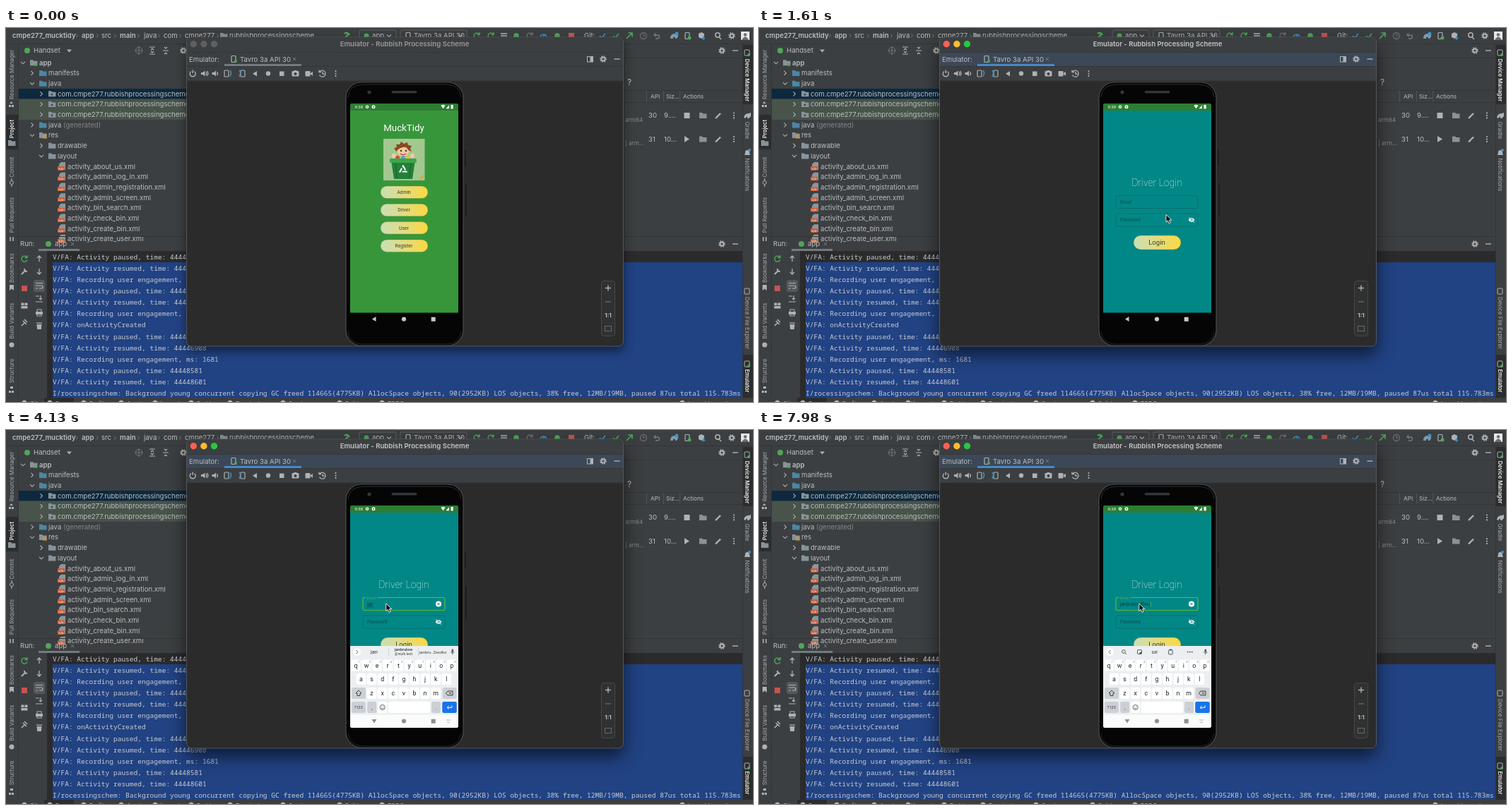
An HTML page that plays this animation: 1057x530 px, repeating every 8000 ms.

```html
<!DOCTYPE html>
<html lang="en">
<head>
<meta charset="utf-8">
<style>
html, body { margin: 0; width: 100%; height: 100%; overflow: hidden; background: #3c3f41; }
svg { display: block; width: 100vw; height: 100vh; font-family: Inter, sans-serif; }
.phone { font-family: Roboto, sans-serif; }
.mono { font-family: "Noto Sans Mono", monospace; }
</style>
</head>
<body>
<svg id="stage" viewBox="0 0 1057 530"></svg>
<script>
const GREY = '#afb1b3', GREEN = '#4fa65a', BLUE = '#3e93c8', TEXT = '#bbbdbf';

const rect = (x, y, w, h, fill, r = 0, more = '') =>
  `<rect x="${x}" y="${y}" width="${w}" height="${h}" rx="${r}" fill="${fill}" ${more}/>`;
const dot = (x, y, r, fill, more = '') => `<circle cx="${x}" cy="${y}" r="${r}" fill="${fill}" ${more}/>`;
const line = (d, color = GREY, w = 1.2, more = '') =>
  `<path d="${d}" fill="none" stroke="${color}" stroke-width="${w}" ${more}/>`;
const shape = (d, fill = GREY) => `<path d="${d}" fill="${fill}"/>`;
const text = (x, y, s, size = 9.6, fill = TEXT, more = '') =>
  `<text x="${x}" y="${y}" font-size="${size}" fill="${fill}" ${more}>${s}</text>`;
const mid = (x, y, s, size, fill, more = '') => text(x, y, s, size, fill, 'text-anchor="middle" ' + more);
const group = (s, more) => `<g ${more}>${s}</g>`;
const list = (items, draw) => items.map(draw).join('');
const BOLD = 'font-weight="600"';

// Small icons, centred on x, y
const gear = (x, y, c = GREY, s = 1) =>
  dot(x, y, 2.6 * s, 'none', `stroke="${c}" stroke-width="${2 * s}"`) +
  dot(x, y, 4.1 * s, 'none', `stroke="${c}" stroke-width="${1.4 * s}" stroke-dasharray="${1.7 * s} ${1.52 * s}"`);
const minus = (x, y) => line(`M${x - 4} ${y}h8`, GREY, 1.4);
const cross = (x, y, c = '#77797b', s = 2.3) => line(`M${x - s} ${y - s}l${2 * s} ${2 * s}m0 ${-2 * s}l${-2 * s} ${2 * s}`, c, 1);
const kebab = (x, y) => list([-3.4, 0, 3.4], d => dot(x, y + d, 1.1, GREY));
const folder = (x, y, c = '#87939a') => shape(`M${x - 5} ${y - 4}h4l1.5 1.5h5v6.5h-10.5z`, c);
const chevron = (x, y, open) => line(open ? `M${x - 3} ${y - 1.5}l3 3 3-3` : `M${x - 1.5} ${y - 3}l3 3-3 3`, GREY, 1.1);
const device = (x, y, c = GREY) => rect(x - 3, y - 4.5, 6, 9, 'none', 1, `stroke="${c}" stroke-width="1.2"`);
const turn = (x, y, c = GREY) => line(`M${x + 3.5} ${y - 2}a4 4 0 1 0 .4 3.5M${x + 4} ${y - 5}v3.5h-3.5`, c, 1.4);
const pencil = (x, y) => line(`M${x - 4} ${y + 4}l7-7`, GREY, 2.4);
const arrow = (x, y, d) => line(`M${x} ${y - 4}v8M${x - 3} ${y + d}l3 ${3 * d} 3 ${-3 * d}`, GREY, 1.3);

function toolbar() {
  const crumbs = [[9, 'cmpe277_mucktidy', 1], [107, 'app', 1], [135, 'src'], [161, 'main', 1], [195, 'java'],
    [223, 'com'], [253, 'cmpe277'], [316, 'rubbishprocessingscheme']];
  return list(crumbs, ([x, s, bold]) => text(x, 14.3, s, 9.6, TEXT, bold ? BOLD : '')) +
    list([100, 129, 154, 187, 216, 246, 299], x => line(`M${x - 1} 8.5l2.5 2.5-2.5 2.5`, '#77797b', 1)) +
    folder(308, 11) + line('M480 14l4-5M479 8q4-3 7 2', GREEN, 2.4) +
    list([[500, 52], [558, 94]], ([x, w]) => rect(x, 3, w, 16, 'none', 2, 'stroke="#5e6062"')) +
    dot(510, 11, 3.5, GREEN) + text(518, 14.3, 'app') + chevron(542, 11, 1) + device(569, 11) +
    text(577, 14.3, 'Tavro 3a API 30') + chevron(643, 11, 1) +
    turn(666, 11, GREEN) + turn(686, 11, GREEN) + line('M700 8h9M700 11h9', GREY, 1.5) +
    dot(722, 11, 3.8, GREEN) + turn(741, 11, '#6d7072') + line('M756 12a5 5 0 0 1 9 0M760 12l3-3', BLUE, 1.5) +
    dot(780, 11, 3.8, GREEN) + rect(796, 7, 8, 8, '#c75450') + text(818, 14.3, 'Git:') +
    line('M840 11l3 3 5-6', BLUE, 1.7) + line('M859 11l3 3 5-6', GREEN, 1.7) +
    line('M878 15l8-8M880.5 7h5.5v5.5', GREEN, 1.7) +
    dot(902, 11, 4.5, 'none', 'stroke="#686b6d" stroke-width="1.3"') + line('M902 8v3h2.5', '#686b6d') +
    line('M919 7l-2 3 3 2M917 10h5a2.5 2.5 0 0 1 0 5h-3', '#77797b', 1.3) +
    shape('M940 15q0-8 8-7l3-1v5l-2 3h-2v-2h-3v2z', '#7d9aab') + dot(949, 8, 2.5, BLUE) +
    device(964, 11) + dot(967, 14, 2.5, GREEN) + shape('M980 8l4-2 4 2v5l-4 2-4-2z') + line('M987 11v5M985 14l2 2 2-2', BLUE, 1.3) +
    dot(1007, 10, 3.2, 'none', `stroke="${GREY}" stroke-width="1.5"`) + line('M1009 13l3 3', GREY, 1.5) + gear(1027, 11) +
    rect(1040, 5, 12, 12, '#e8e8e8') + dot(1046, 9.5, 2.2, '#6a6c6e') + shape('M1041 17q5-9 10 0z', '#6a6c6e');
}

function projectTree() {
  const y = i => 49.3 + 14.68 * i, pkg = 'com.cmpe277.rubbishprocessingscheme';
  const files = ['about_us', 'admin_log_in', 'admin_registration', 'admin_screen', 'bin_search', 'check_bin', 'create_bin', 'create_user'];
  const rows = [[28, 'app', 1], [41, 'manifests', 0], [41, 'java', 1], [54, pkg, 0], [54, pkg, 0], [54, pkg, 0],
    [41, 'java', 0], [41, 'res', 1], [54, 'drawable', 0], [54, 'layout', 1]];
  return rect(17, 86, 240, 14.6, '#0d293e') + rect(17, 100.6, 240, 29.4, '#48534a') +
    dot(30, 32, 4, GREEN) + text(39, 35.3, 'Handset') + shape('M86 30.5h7l-3.5 4z') +
    dot(188, 32, 4.5, 'none', 'stroke="#6d7072" stroke-width="1.2"') + line('M188 26v12M182 32h12', '#6d7072') +
    line('M203 27h8M203 37h8M205 31l2-2 2 2M205 33l2 2 2-2', GREY) + line('M222 32h8M224 27l2 2 2-2M224 37l2-2 2 2', GREY) + gear(251, 32) +
    list(rows, ([x, name, open], i) => chevron(x - 4, y(i), open) +
      folder(x + 11, y(i), i == 1 || i == 2 || i == 6 ? '#4b87a5' : '#87939a') +
      (i == 0 ? dot(x + 14, y(i) + 3, 2, GREEN) : '') + (i > 2 && i < 6 ? dot(x + 11, y(i) + 1, 1.3, '#3c3f41') : '') +
      (i == 7 ? line(`M${x + 11} ${y(i)}h6m-6 2h6m-6 2h6`, '#d39a3e', 1) : '') +
      text(x + 19, y(i) + 3.4, name + (i == 6 ? ' <tspan fill="#85878a">(generated)</tspan>' : ''), 9.6, TEXT, i ? '' : BOLD)) +
    list(files, (name, i) => shape(`M75 ${y(i + 10) - 3}l3-3h6v11h-9z`, '#8b969d') + rect(73, y(i + 10), 10, 5.5, '#cf5d38') +
      mid(78, y(i + 10) + 4.4, '&lt;/&gt;', 4.5, '#fff', BOLD) + text(87, y(i + 10) + 3.4, `activity_${name}.xml`));
}

function sideBars() {
  const left = [['Resource Manager', 66, 108], ['Project', 143, 163, 1], ['Commit', 197, 219], ['Pull Requests', 265, 298],
    ['Bookmarks', 340, 368], ['Build Variants', 415, 448], ['Structure', 486, 512]];
  const right = [['Device Manager', 74, 35, 1], ['Gradle', 145, 124], ['Notifications', 208, 177],
    ['Device File Explorer', 418, 373], ['Emulator', 500, 476, 1]];
  const side = (labels, x, angle) => list(labels, ([s, y, icon, on]) =>
    mid(0, 2.8, s, on ? 7.7 : 7.9, on ? '#eee' : '#a9abad', `transform="translate(${x} ${y}) rotate(${angle})"` + (on ? BOLD : '')));
  const bar = y => rect(1045, y - 4, 7, 8, 'none', 1, `stroke="${GREY}"`);
  return rect(0, 123, 17, 49, '#2b2d2e') + rect(1042, 24, 15, 84, '#2b2d2e') + rect(1042, 463, 15, 67, '#2b2d2e') +
    line('M17.5 22V524M1042.5 22V524', '#323436', 1) + side(left, 8, -90) + side(right, 1049, 90) +
    shape('M4 112v-3h3v3zM8 112v-3h3v3zM5 107l2.500-3 2.500 3z') + folder(8, 163) +
    dot(8, 219, 2.5, 'none', `stroke="${GREY}"`) + line('M8 213v3M8 222v3') + line('M6 295v7M10 295v7', GREY, 1.6) +
    shape('M5 364h6v8l-3-2.500-3 2.500z') + dot(8, 449, 3.5, GREY) + shape('M4 514h3v3h-3zM8 514h3v3h-3zM6 508h4v3h-4z') +
    bar(35) + dot(1051, 38, 2, GREEN) + shape('M1044 127q1-6 7-6l3-1v5l-3 3h-2v-2h-2v2z') +
    shape('M1045 180q1-2 1-4a3 3 0 0 1 6 0q0 2 1 4z') + dot(1052, 173, 2, BLUE) + bar(373) + bar(476) + dot(1051, 479, 2, GREEN);
}

function deviceTable() {
  const row = (y, api, size, abi, running) => text(876, y + 8.5, abi, 8.2, '#85878a') + text(909, y + 3.4, api) + text(931, y + 3.4, size) +
    (running ? rect(959.5, y - 4, 8, 8, GREY) : shape(`M960 ${y - 4.500}l7 4.500-7 4.500z`)) + folder(986, y) + pencil(1008, y) + kebab(1030, y);
  return gear(1013, 32) + minus(1032, 32) + line('M874 42.500H1042M874 88.500H1042M874 105.500H1042', '#323436', 1) +
    line('M906.500 89v16M930.500 89v16M953.500 89v16', '#505355', 1) + text(879, 81, '?', 12) +
    text(912, 100, 'API', 8.2) + text(934, 100, 'Siz...', 8.2) + text(958, 100, 'Actions', 8.2) +
    row(124, '30', '9....', 'arm64', 1) + row(157.500, '31', '10...', '| arm...', 0);
}

function runPanel() {
  const act = 'V/FA: Activity ', paused = act + 'paused, time: ', resumed = act + 'resumed, time: ', rec = 'V/FA: Recording user engagement, ms: ';
  const log = [paused + 44441204, resumed + 44441226, rec + 2140, paused + 44443371, resumed + 44443402, rec + 3466,
    'V/FA: onActivityCreated', paused + 44446880, resumed + 44446908, rec + 1681, paused + 44448581, resumed + 44448601,
    'I/rocessingschem: Background young concurrent copying GC freed 114665(4775KB) AllocSpace objects, 90(2952KB) LOS objects, 38% free, 12MB/19MB, paused 87us total 115.783ms'];
  const tabs = [[34, 'Git'], [70, 'Run'], [118, 'Profiler'], [171, 'App Inspection'], [219, 'Logcat'], [270, 'Problems'], [325, 'Terminal'],
    [400, 'Services'], [480, 'Build'], [540, 'TODO'], [965, 'Layout Inspector']];
  return line('M0 295.500H1042', '#323436', 1) + text(20, 309.400, 'Run:') + dot(60, 306, 4, GREEN) + text(69, 309.400, 'app') + cross(94, 306) +
    rect(46, 313, 58, 3, '#747a80') + gear(1013, 306) + minus(1032, 306) +
    rect(58, 316, 984, 208, '#2b2b2b') + rect(66, 332, 976, 192, '#214283') +
    group(list(log, (s, i) => text(66, 327.700 + 16.130 * i, s, 9.55, '#c8ccd2')), 'class="mono"') +
    turn(26, 327, GREEN) + line('M22 349l5-5M26 341q0 4 4 4', GREY, 2) + rect(22, 365, 8, 8, '#c75450') +
    rect(21.500, 389.500, 4, 3.500, GREY) + rect(26.500, 389.500, 4, 3.500, GREY) + rect(21.500, 394, 9, 3.500, GREY) +
    line('M22 422l4-4M24 415l5 5M26 413l4 4', GREY, 1.600) + arrow(47, 327, -1) + arrow(47, 345, 1) +
    rect(39, 357, 16, 17, '#55585a', 3) + line('M42 361.500h10M42 365h8a2 2 0 0 1 0 4h-3M42 369h3', GREY) +
    line('M42 380h5M42 388h10M49 379v6M47 383l2 2 2-2') + rect(42, 402, 10, 4, GREY) + rect(44, 399, 6, 9, 'none', 0, `stroke="${GREY}"`) +
    shape('M43.500 420h7l-.7 7h-5.600zM43 417.500h8v1.300h-8z') +
    rect(0, 524, 1057, 6, '#3c3f41') + rect(54, 524, 42, 6, '#2b2d2e') +
    list(tabs, ([x, s]) => text(x, 534.500, s, 8.2) + dot(x - 8, 531, 3.500, GREY));
}

const ide = rect(0, 0, 1057, 530, '#3c3f41') + line('M0 22.500H1057', '#323436', 1) +
  toolbar() + projectTree() + sideBars() + deviceTable() + runPanel();

const emulatorTools = () => line('M262 61.500a4 4 0 1 0 4.500 0M264.300 59.500v4.500', GREY, 1.400) +
  list([281, 296.500], x => shape(`M${x - 5} ${62.900}h2.500l3-2.500v8l-3-2.500h-2.500z`) + line(`M${x + 2} 62q2 2.500 0 5`)) +
  line('M284.500 61q3 3.500 0 7') +
  list([[314, 1], [333, -1]], ([x, d]) => device(x - 2 * d, 64.500) + line(`M${x + 3 * d} 60q3 3 0 9`, BLUE, 1.400)) +
  shape('M355 61v7.500l-6-3.750z') + dot(371, 64.500, 3.200, GREY) + rect(387, 61.500, 6.500, 6.500, GREY) +
  rect(404.500, 61, 10, 7.500, GREY, 1) + dot(409.500, 65, 2, '#3c3f41') + rect(407.500, 60, 4, 2, GREY) +
  rect(423.500, 61, 7, 7.500, GREY, 1) + shape('M430 64.700l4-3v6z') + line('M444 62a4.500 4.500 0 1 1-.5 4.500M443 59.500v3h3M448 62v3h2.500', GREY, 1.300) + kebab(466.500, 64.500) +
  rect(842.500, 358.500, 19, 78, '#2f3133', 3, 'stroke="#46494b"') + line('M848 368.500h8M852 364.500v8', GREY, 1.400) +
  line('M848 388h8', '#66696b', 1.300) + mid(852, 410, '1:1', 8, TEXT, 'font-weight="700"') + rect(847.500, 422.500, 9, 7, 'none', 0, 'stroke="#66696b"');

const phoneBody = rect(481, 77, 166, 373, '#050505', 22, 'stroke="#4a4b4d" stroke-width="1.200"') +
  line('M484 98q1-17 21-18H623q20 1 21 18', '#2c2d2e', 1) + line('M484 430q2 17 20 18H624q18-1 20-18', '#242526', 1) +
  rect(649, 172, 2, 23, '#1d1e1f', 1) + rect(650, 220, 1.800, 48, '#111', 1, 'stroke="#444" stroke-width=".4"') +
  dot(514, 91, 2.600, '#333638') + rect(545.500, 89, 36, 3.500, '#333537', 1.700);

function windowFrame(active) {
  const lights = active ? ['#ff5f57', '#febc2e', '#28c840'] : Array(3).fill('#5d5f61');
  const shadow = active ? '0 11px 12px rgba(0,0,0,.6)' : '0 6px 7px rgba(0,0,0,.5)';
  return rect(255.500, 13, 618, 438, '#2b2b2b', 7, `stroke="#616365" stroke-width=".8" style="filter:drop-shadow(${shadow})"`) +
    shape('M256 75V20q0-6.500 6.500-6.500H867q6 0 6 6.500V75z', '#3c3f41') +
    list(lights, (c, i) => dot(265.300 + 14.600 * i, 22.700, 4.700, c)) +
    mid(564, 25.700, 'Emulator - Rubbish Processing Scheme', 9.6, active ? '#c4c5c6' : '#98999a', BOLD) +
    rect(256, 34.500, 617, 19.500, active ? '#3c4857' : '#3c3f41') + line('M256 34.500H873M256 54.500H873M256 75H873', '#323436', .8) +
    rect(309, 51, 109, 3, active ? '#4a88c7' : '#747a80') + text(259, 47.700, 'Emulator:') + device(322, 44) + dot(325, 47, 2, GREEN) +
    text(331, 47.700, 'Tavro 3a API 30') + cross(408, 44) + rect(822.500, 40.500, 8, 7.500, 'none', 0, `stroke="${GREY}"`) +
    rect(826.500, 41, 4, 7, GREY) + gear(845, 44) + minus(864.500, 44) + emulatorTools() + phoneBody;
}

const statusBar = rect(487, 107, 153, 10, '#2d7d32') + text(493.500, 114, '9:38', 6, '#fff') + gear(511, 111.700, '#fff', .55) +
  dot(520, 111.700, 2.500, '#fff') + dot(520, 111.700, 1, '#2d7d32') + shape('M615.500 110q3-2.400 6 0l-3 4.200zM622.500 114.200h4.500v-5z', '#fff') + rect(629.500, 109, 3.200, 5.400, '#fff', .6);
const pill = (y, h, s, size) => rect(530, y, 67, h, 'url(#pill)', h / 2, 'stroke="#5d8b35" stroke-width=".4"') + mid(563, y + h / 2 + size * .35, s, size, '#3b3f2c');

const binPicture = rect(534, 157, 58.500, 59, '#a3c88f') +
  dot(562, 174, 8.300, '#f3c9a2') + shape('M552 175l-3-5 4-1-1-4 5 0 2-4 4 3 5-2 1 4 5 1-2 4 2 4-5-2q-2-5-7-4t-7 3z', '#8a4a20') +
  dot(559, 174, 1.200, '#333') + dot(566, 174, 1.200, '#333') + line('M558 178q4 3.500 8 0', '#b03a30', 1.100) +
  dot(549, 181, 3.200, '#f3c9a2') + dot(575, 181, 3.200, '#f3c9a2') + dot(554, 184, 3, '#d9483b') + dot(569, 184, 3, '#e4c13c') + dot(562, 184, 3, '#5aa0cf') +
  shape('M545 188h34l-4 26h-26z', '#23813a') + rect(543, 185, 38, 6, '#3aa64b', 2) + line('M551 192l2 20M573 192l-2 20', '#17632b', 1) +
  line('M562 195.500l4.500 8h-9z', '#fff', 2, 'stroke-dasharray="6.500 2"') + line('M586 214l5-5', '#e39a36', 2);

const homeScreen = rect(487, 107, 153, 297, '#38963a') + mid(563, 146, 'MuckTidy', 13.300, '#fff') + binPicture +
  list(['Admin', 'Driver', 'User', 'Register'], (s, i) => pill(224 + 25.300 * i, 17.500, s, 6.800));

const navBar = (color, angle) => group(shape('M-3 0l5.500-3.500v7z', color), `transform="translate(521 412.500) rotate(${angle})"`) +
  dot(563, 412.500, 3.100, color) + rect(601.700, 409.700, 6, 6, color);

function loginScreen(t) {
  const focused = t >= 2310, n = typed(t), composing = n && n < 10 ? suggested(t) : 0;
  const field = y => rect(505, y, 116, 18, 'none', 2, 'stroke="#0a6f6c" stroke-width=".9"');
  const email = ADDRESS.slice(0, n), caret = focused && caretOn(t) ? '<tspan fill="#9ccc3c">|</tspan>' : '';
  let s = rect(487, 107, 153, 297, '#018786') + mid(563, 223.600, 'Driver Login', 14, '#e9f5f4', 'font-weight="100"') +
    (focused ? rect(505, 237.500, 116, 18, 'none', 2, 'stroke="#62b83a" stroke-width="1.200"') + rect(509.500, 236.500, 16, 2, '#018786') + text(511, 240, 'Email', 5, '#59a94a')
      : field(237.500) + text(511, 248.900, 'Email', 6.500, '#064f4d')) +
    field(263) + text(511, 274.300, 'Password', 6.500, '#064f4d') +
    shape('M607.500 272q4.500-6 9 0-4.500 6-9 0z', '#fff') + dot(612, 272, 1.500, '#018786') + line('M608 268.500l8 7', '#fff', 1) + line('M609 268l8 7', '#018786', .7) +
    pill(294, 20, 'Login', 9.600);
  if (focused) s += text(511, 248.900, email.slice(0, composing).replace(/.+/, '<tspan text-decoration="underline">$&</tspan>') + email.slice(composing) + caret, 6.500, '#073d3c');
  if (n) s += dot(612, 246.500, 4, '#fff') + cross(612, 246.500, '#018786', 1.500);
  return s;
}

const key = (x, y, w, fill = '#fff') => rect(x - w / 2, y - 8, w, 16, fill, 2.500);
const letters = (s, x0, y, digits) => list([...s], (c, i) => {
  const x = x0 + 15.100 * i;
  return key(x, y, 13.600) + mid(x, y + 3, c, 8.800, '#222') + (digits ? mid(x + 4.700, y - 3.500, (i + 1) % 10, 3.600, '#666') : '');
});
const GRAY_KEY = '#ccd0d5', INK = '#55595d';
const keys = letters('qwertyuiop', 495, 333.500, 1) + letters('asdfghjkl', 502.500, 353) + letters('zxcvbnm', 517.500, 373) +
  key(499, 373, 20, GRAY_KEY) + line('M499 369l-4 4h2v3.500h4v-3.500h2z', '#333', .9) +
  key(627.500, 373, 20, GRAY_KEY) + line('M625 370h7v6h-7l-2.500-3zM627 371.500l3 3m0-3l-3 3', '#333', .9) +
  key(498.800, 393, 20, GRAY_KEY) + mid(498.800, 395, '?123', 5.500, '#333') + key(517.700, 393, 13, GRAY_KEY) + mid(517.700, 396, ',', 8, '#333') +
  key(532.700, 393, 13) + dot(532.700, 393, 3.600, 'none', 'stroke="#444" stroke-width=".8"') + line('M531 394q1.700 2 3.400 0M531.300 391.500v1M534 391.500v1', '#444', .8) +
  key(570.500, 393, 59) + key(608.500, 393, 13, GRAY_KEY) + mid(608.500, 395.500, '.', 8, '#333') +
  key(627.500, 393, 20.500, '#1a73e8') + line('M631 390.500v2.800h-6.500M626.500 391l-2.300 2.300 2.300 2.300', '#fff', 1);

function strip(t) {
  const word = t >= 3150 && t < 7210, base = dot(496.500, 314.500, 5.500, '#fff') +
    line(word ? 'M495.500 312l2.500 2.500-2.500 2.500' : 'M497.500 312l-2.500 2.500 2.500 2.500', INK, 1) +
    rect(630.500, 310.500, 2.600, 5, INK, 1.300) + line('M629 314.500q2.800 4 5.600 0M631.800 316.500v2', INK, .8);
  if (word) return base + mid(521, 317, USER.slice(0, suggested(t)), 7.400, '#333') + (t < 3570 ? '' :
    mid(562.500, 312.500, USER, 5.800, '#333', 'font-weight="500"') + mid(562.500, 318.500, DOMAIN, 5.200, '#444') +
    mid(604, 317, 'janbru..2wulko', 6, '#444') + line('M541.500 309v11M583.500 309v11', '#c4c8cc', .7));
  return base + dot(516, 314, 2.300, 'none', `stroke="${INK}"`) + line('M518 316l2 2', INK, 1) +
    rect(535.500, 311.500, 6, 6, 'none', 1.500, `stroke="${INK}"`) + dot(540, 316, 1.600, INK) + mid(560, 316.800, 'GIF', 5.500, INK, 'font-weight="700"') +
    rect(579.700, 311.500, 5.500, 6.500, 'none', .7, `stroke="${INK}"`) + rect(581, 310.500, 3, 2, INK) + list([606.800, 609.800, 612.800], x => dot(x, 314.500, .9, INK));
}

// Typing: times at which the entry and the suggestion grow
const USER = 'janbrulow', DOMAIN = '@wulk.test', ADDRESS = USER + DOMAIN;
const typeTimes = [3080, 3220, 3360, 5040, 5600, 5740, 5950, 6090, 6300, 7000, 7630, 7980];
const suggestTimes = [3150, 3290, 3570, 5250, 5740, 5810, 5950, 6090, 6580];
const count = (times, t) => times.filter(x => x <= t).length;
const typed = t => count(typeTimes, t), suggested = t => count(suggestTimes, t);
const caretOn = t => {
  const last = Math.max(2240, ...typeTimes.concat(suggestTimes, 7210).filter(x => x <= t));
  return Math.floor((t - last) / 560) % 2 == 0;
};

const clamp = x => Math.min(1, Math.max(0, x));
const ramp = (t, from, to) => clamp((t - from) / (to - from));

function screen(t) {
  const open = ramp(t, 1370, 1560), rise = ramp(t, 2310, 2660), keyboard = rise > 0;
  return rect(487, 107, 153, 315, '#050505') + (open < 1 ? homeScreen : '') +
    (open > 0 ? group(loginScreen(t), `opacity="${open}" transform="translate(0 ${18 * (1 - open) ** 2})"`) : '') + statusBar +
    (keyboard ? group(rect(487, 306, 153, 120, '#eceff1') + strip(t) + keys, `transform="translate(0 ${116 * (1 - rise) ** 3.7})"`) +
      rect(487, 403.500, 153, 19, '#fafbfb') + line('M623 411h6M624 413.500l2 1.500 2-1.500', '#aaa', .9) : rect(487, 403.500, 153, 19, '#050505')) +
    navBar(keyboard ? '#8b8f92' : '#c8c8c8', -90 * rise ** 2);
}

const path = [[420, 557, 251], [630, 583, 262], [1330, 583, 262], [1610, 576, 264.500], [2100, 537.800, 246], [8000, 537.800, 246]];
function pointer(t) {
  if (t < 420) return '';
  const i = path.findIndex(p => t < p[0]), [t0, x0, y0] = path[i - 1], [t1, x1, y1] = path[i];
  const p = ramp(t, t0, t1), e = p * p * (3 - 2 * p);
  return group('<path d="M0 0v10.500l2.500-2.200 1.700 4 2-.9-1.700-3.800h3.300z" fill="#000" stroke="#fff" stroke-width=".9"/>',
    `transform="translate(${x0 + (x1 - x0) * e} ${y0 + (y1 - y0) * e})"`);
}

const stage = document.getElementById('stage');
stage.innerHTML = `<defs>
  <linearGradient id="pill"><stop offset="0" stop-color="#c9dfb4"/><stop offset=".35" stop-color="#dbdd94"/><stop offset="1" stop-color="#fbd83f"/></linearGradient>
  <clipPath id="glass"><rect x="487" y="107" width="153" height="315" rx="3"/></clipPath></defs>
  ${ide}<g id="frame"></g><g id="screen" class="phone" clip-path="url(#glass)"></g><g id="pointer"></g>`;

const layers = { frame: t => windowFrame(t >= 840), screen, pointer }, shown = {};
function draw() {
  const t = performance.now() % 8000;
  for (const id in layers) {
    const markup = layers[id](t);
    if (markup !== shown[id]) document.getElementById(id).innerHTML = shown[id] = markup;
  }
  requestAnimationFrame(draw);
}
draw();
</script>
</body>
</html>
```
